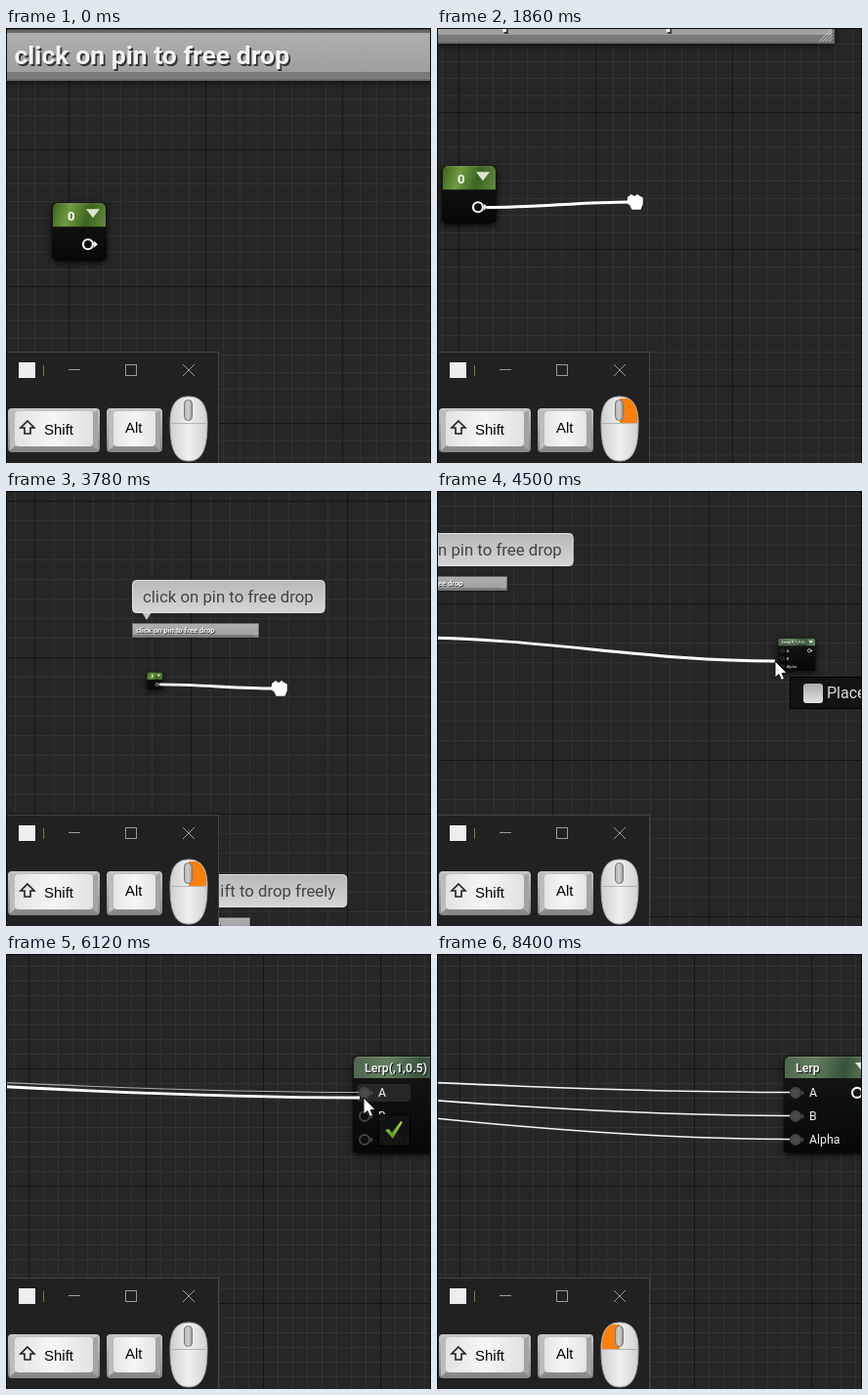
Write an HTML page with a canvas that moves like this. It is 435 px wide and 445 px high and loops after 8460 ms.

```html
<!DOCTYPE html>
<html lang="en">
<head>
<meta charset="utf-8">
<title>Free drop</title>
<style>
html, body { margin: 0; width: 100%; height: 100%; overflow: hidden; background: #262626; }
canvas { display: block; }
</style>
</head>
<body>
<canvas id="stage" width="435" height="445"></canvas>
<script>
const ctx = document.getElementById('stage').getContext('2d');
const W = 435, H = 445, LOOP = 8460, STEP = 60;
const UI = 'Roboto, sans-serif', KEY = '"Liberation Sans", Arial, sans-serif';
const ORANGE = '#ff7f0a';

// Tracks hold [time, x, y]; the camera is zoom plus the screen place of the world origin.
const POINTER = [
  [120, 415, 63], [480, 250, 130], [900, 87, 217], [1260, 87, 217], [1560, 246, 213],
  [1620, 246, 213], [1860, 199, 178], [1980, 235, 193], [3180, 235, 193], [3420, 311, 200],
  [3600, 311, 200], [3780, 276, 202], [4140, 90, 154], [4440, 346, 174], [5400, 346, 174],
  [5760, 366, 147], [6120, 366, 147], [6360, 368, 168], [6660, 368, 168], [6900, 373, 184],
  [7440, 373, 184], [7920, 452, 160]
];
const PAN_A = [[1620, -6, 1.5], [1860, -48, -36.5], [1980, -17, -19]];
const PAN_B = [[3600, 163, 132.5], [3780, 129, 135], [4140, -58, 87]];
const ZOOMS = [
  [2040, .75], [2220, .675], [2640, .5], [2820, .375], [3240, .25],
  [4560, .375], [4800, .5], [5040, .675], [5280, .75]
];
const CLICKS = [1140, 6000, 6540, 7140, 7980, 8400];
const TITLES = ['Lerp(0,1,0.5)', 'Lerp(,1,0.5)', 'Lerp(,,0.5)', 'Lerp'];
const LERP_WIDTHS = [115, 108, 102, 94];
const PINS = ['A', 'B', 'Alpha'];
const within = (t, a, b) => t >= a && t < b;

function track(keys, t) {
  if (t <= keys[0][0]) return keys[0].slice(1);
  for (let i = 1; i < keys.length; i++) {
    const [t0, x0, y0] = keys[i - 1], [t1, x1, y1] = keys[i];
    if (t < t1) {
      const k = (t - t0) / (t1 - t0);
      return [x0 + (x1 - x0) * k, y0 + (y1 - y0) * k];
    }
  }
  return keys[keys.length - 1].slice(1);
}

function camera(t) {
  let z = .875, [x, y] = track(PAN_A, t), panned = false;
  const panB = () => { if (!panned && t >= 3600) { [x, y] = track(PAN_B, t); panned = true; } };
  for (const [time, next] of ZOOMS) {
    if (time > 3600) panB();
    if (t < time) break;
    const [fx, fy] = time < 3600 ? [235, 193] : [346, 174];
    x = fx - (fx - x) * next / z;
    y = fy - (fy - y) * next / z;
    z = next;
  }
  return { z, x, y };
}

function box(x, y, w, h, r, fill, stroke) {
  ctx.beginPath();
  ctx.roundRect(x, y, w, h, r);
  if (fill) { ctx.fillStyle = fill; ctx.fill(); }
  if (stroke) { ctx.strokeStyle = stroke; ctx.lineWidth = 1; ctx.stroke(); }
}

function poly(points, fill, stroke, width = 1) {
  ctx.beginPath();
  points.forEach(([x, y]) => ctx.lineTo(x, y));
  ctx.closePath();
  if (fill) { ctx.fillStyle = fill; ctx.fill(); }
  if (stroke) { ctx.strokeStyle = stroke; ctx.lineWidth = width; ctx.stroke(); }
}

function line(x0, y0, x1, y1, color, width = 1) {
  ctx.beginPath();
  ctx.moveTo(x0, y0);
  ctx.lineTo(x1, y1);
  ctx.strokeStyle = color;
  ctx.lineWidth = width;
  ctx.stroke();
}

function text(str, x, y, font, color) {
  ctx.font = font;
  ctx.fillStyle = color;
  ctx.fillText(str, x, y);
}

function fade(x0, y0, x1, y1, ...colors) {
  const g = ctx.createLinearGradient(x0, y0, x1, y1);
  colors.forEach((c, i) => g.addColorStop(i / (colors.length - 1), c));
  return g;
}

function placed(x, y, scale, draw) {
  ctx.save();
  ctx.translate(x, y);
  ctx.scale(scale, scale);
  draw();
  ctx.restore();
}

function drawGrid(cam, t) {
  ctx.fillStyle = '#262626';
  ctx.fillRect(0, 0, W, H);
  let cell = 20;
  while (cell * cam.z <= 10) cell *= 2;
  const [px, py] = t < 4500 ? [-400, 140] : [65, 112];
  const step = cell * cam.z, gx = cam.x + px * cam.z, gy = cam.y + py * cam.z;
  for (const major of [false, true]) {
    ctx.fillStyle = major ? '#151515' : '#323232';
    const rule = (start, size, put) => {
      for (let i = Math.ceil(-start / step); start + i * step < size; i++)
        if ((i % 8 === 0) === major) put(Math.round(start + i * step));
    };
    rule(gx, W, x => ctx.fillRect(x, 0, 1, H));
    rule(gy, H, y => ctx.fillRect(0, y, W, 1));
  }
}

function drawComment(cam, wx, wy, label) {
  const { z } = cam, x = cam.x + wx * z, y = cam.y + wy * z, w = 520 * z, h = 60 * z;
  ctx.save();
  ctx.shadowColor = 'rgba(0,0,0,.7)';
  ctx.shadowBlur = 8 * z;
  ctx.shadowOffsetY = 2 * z;
  box(x, y, w, h, 1, '#686868');
  ctx.restore();
  ctx.fillStyle = fade(0, y, 0, y + h, '#b0b0b0', '#9c9c9c');
  ctx.fillRect(x + 3 * z, y + 4 * z, w - 6 * z, h - 14 * z);
  ctx.fillStyle = '#7a7a7a';
  ctx.fillRect(x + 3 * z, y + h - 10 * z, w - 6 * z, 8 * z);
  for (let i = 1; i < 5; i++)
    line(x + w - 4 * i * z - 2, y + h - 2, x + w - 2, y + h - 4 * i * z - 2, '#c8c8c8', z);
  const font = `bold ${30.4 * z}px ${UI}`, off = Math.max(.6, 2 * z);
  text(label, x + 16.5 * z + off, y + 40.5 * z + off, font, '#333');
  text(label, x + 16.5 * z, y + 40.5 * z, font, '#f4f4f4');

  if (z > .5) return;
  const bubble = `16.8px ${UI}`;
  ctx.font = bubble;
  const bw = ctx.measureText(label).width + 23, by = y - 44;
  poly([[x + 10, by + 33], [x + 20, by + 33], [x + 15, by + 41]], '#c4c4c4');
  box(x + .5, by + .5, bw - 1, 33, 4, fade(0, by, 0, by + 34, '#b8b8b8', '#d6d6d6'), '#e0e0e0');
  text(label, x + 11, by + 23, bubble, '#444');
}

function nodeBody(w, h, header, fill) {
  ctx.save();
  ctx.shadowColor = 'rgba(0,0,0,.8)';
  ctx.shadowBlur = 7;
  ctx.shadowOffsetY = 2;
  box(0, 0, w, h, 5, fade(0, 0, 0, h, '#151815', '#060706'));
  ctx.restore();
  box(1, 1, w - 2, header, [5, 5, 0, 0], fill);
  ctx.fillStyle = 'rgba(255,255,255,.18)';
  ctx.fillRect(4, 1, w - 8, 1);
  poly([[w - 21, 7], [w - 7, 7], [w - 14, 16]], '#dbe6d2');
}

function outPin(x, y) {
  ctx.beginPath();
  ctx.arc(x, y, 5, 0, 7);
  ctx.strokeStyle = '#f2f2f2';
  ctx.lineWidth = 2.2;
  ctx.stroke();
  poly([[x + 6, y - 3.5], [x + 10, y], [x + 6, y + 3.5]], '#f2f2f2');
}

function drawConstant(cam, hot) {
  placed(cam.x + 60.5 * cam.z, cam.y + 202 * cam.z, cam.z / .875, () => {
    nodeBody(56, 60, 24, fade(0, 0, 56, 18, '#385a1c', '#6f9c40', '#3c6420', '#62883c'));
    if (hot) box(20, 32, 32, 23, 3, fade(20, 0, 52, 0, '#777', '#333'));
    text('0', 16, 19, `bold 13px ${UI}`, '#fff');
    outPin(37, 43);
  });
}

function drawLerp(cam, made, hover) {
  placed(cam.x + 1628 * cam.z, cam.y + 254.5 * cam.z, cam.z / .75, () => {
    const w = LERP_WIDTHS[made];
    nodeBody(w, 100, 22, fade(0, 0, w, 16, '#4c634c', '#62805f', '#36523a', '#6c8868'));
    text(TITLES[made], 13, 18, `bold 12.3px ${UI}`, '#111');
    text(TITLES[made], 12, 17, `bold 12.3px ${UI}`, '#eee');
    PINS.forEach((name, i) => {
      const y = 38 + i * 24;
      if (hover === i) box(4, y - 9, 55, 18, 4, '#262826');
      ctx.beginPath();
      ctx.arc(12, y, 5, 0, 7);
      ctx.fillStyle = i < made ? '#484a48' : '#0c0d0c';
      ctx.fill();
      ctx.strokeStyle = '#424442';
      ctx.lineWidth = 2;
      ctx.stroke();
      poly([[18, y - 3], [21, y], [18, y + 3]], '#424442');
      text(name, 26, y + 4.5, `12.3px ${UI}`, '#eee');
    });
    outPin(w - 19, 38);
  });
}

function drawWire(x0, y0, x1, y1, color, width) {
  const pull = (Math.min(Math.abs(x1 - x0), 1000) + Math.min(Math.abs(y1 - y0), 1000)) / 3;
  ctx.beginPath();
  ctx.moveTo(x0, y0);
  ctx.bezierCurveTo(x0 + pull, y0, x1 - pull, y1, x1, y1);
  ctx.strokeStyle = color;
  ctx.lineWidth = width;
  ctx.stroke();
}

function check(x, y, color) {
  poly([[x - 9, y], [x - 5, y - 1], [x - 2, y + 3], [x + 7, y - 9], [x + 9, y - 8], [x - 1, y + 9]], color);
}

function drawTip(x, y, kind) {
  x = Math.round(x) + 15;
  y = Math.round(y) + 16;
  const w = { place: 167, multi: 190, ok: 33 }[kind];
  if (kind !== 'place') { y += 1; if (kind === 'multi') x -= 1; }
  box(x + .5, y + .5, w - 1, 32, 0, 'rgba(17,17,17,.95)', '#000');
  if (kind === 'ok') return check(x + 16, y + 16, fade(0, y + 6, 0, y + 26, '#a5d84a', '#4c8c1c'));
  if (kind === 'multi') {
    check(x + 22, y + 17, fade(0, y + 6, 0, y + 26, '#ffe92e', '#e8b800'));
    return text('Multi-drop mode', x + 37, y + 21, `16px ${UI}`, '#ddd');
  }
  box(x + 14, y + 7, 20, 20, 3, fade(0, y + 7, 0, y + 27, '#aaa', '#e2e2e2'));
  text('Place a new node.', x + 38, y + 22, `16px ${UI}`, '#ddd');
}

function drawArrow(x, y) {
  const shape = [[0, 0], [0, 17], [4, 13.5], [6.5, 19.5], [9.5, 18], [7, 12.5], [12, 12]];
  poly(shape.map(([a, b]) => [x + a, y + b]), '#fff', '#111');
}

function drawHand(x, y) {
  const fist = [[-3, -5], [0, -7], [3, -5], [6, -7], [9, -5], [11, -4], [11, 2], [9, 7], [1, 7], [-1, 3], [-4, 1]];
  poly(fist.map(([a, b]) => [x + a, y + b]), '#fff', '#fff', 1.5);
}

function drawKey(x, w, label, tx, ty) {
  box(x, 389, w, 45, 4, fade(0, 389, 0, 434, '#c6c6c6', '#858585'));
  poly([[x + 2, 391], [x + 8, 394], [x + 8, 427], [x + 2, 432]], '#bcbcbc');
  poly([[x + w - 2, 391], [x + w - 8, 394], [x + w - 8, 427], [x + w - 2, 432]], '#a4a4a4');
  box(x + 7, 392, w - 14, 36, 4, fade(x, 0, x + w, 0, '#e0e0e0', '#f6f6f6', '#dedede'));
  text(label, tx, ty, `15px ${KEY}`, '#000');
}

function drawMouse(button) {
  const body = new Path2D('M187 377C201 377 206 388 206 404C206 428 202 443 187 443C172 443 168 428 168 404C168 388 173 377 187 377Z');
  ctx.fillStyle = fade(168, 0, 206, 0, '#cfcfcf', '#f0f0f0', '#d2d2d2');
  ctx.fill(body);
  ctx.save();
  ctx.clip(body);
  ctx.fillStyle = ORANGE;
  if (button === 'left') ctx.fillRect(169, 379, 18, 25);
  if (button === 'right') ctx.fillRect(187, 379, 18, 25);
  ctx.restore();
  ctx.strokeStyle = '#aaa';
  ctx.lineWidth = 1;
  ctx.stroke(body);
  line(169, 404.5, 205, 404.5, '#b4b4b4');
  box(182.5, 380.5, 8, 21, 4, fade(182, 0, 191, 0, '#aaa', '#d0d0d0', '#909090'), '#777');
  if (button === 'wheel') box(183, 388, 8, 11, 4, ORANGE);
}

function drawPanel(button) {
  ctx.fillStyle = '#212121';
  ctx.fillRect(0, 331, 218, 114);
  line(0, 331.5, 218, 331.5, '#444');
  line(217.5, 331, 217.5, 445, '#444');
  ctx.fillStyle = '#eee';
  ctx.fillRect(13, 342, 17, 16);
  ctx.fillStyle = '#8a7628';
  ctx.fillRect(38, 345, 1, 11);
  line(64, 349.5, 76, 349.5, '#999');
  ctx.strokeRect(122.5, 344.5, 11, 11);
  line(181, 344, 193, 356, '#999');
  line(193, 344, 181, 356, '#999');
  drawKey(2, 94, 'Shift', 39, 416);
  poly([[22, 402], [29, 409], [25, 409], [25, 415], [19, 415], [19, 409], [15, 409]], null, '#222', 1.6);
  drawKey(103, 57, 'Alt', 122, 414);
  drawMouse(button);
}

function pressed(t) {
  if (CLICKS.some(c => within(t, c, c + 120))) return 'left';
  if (within(t, 1620, 1980) || within(t, 3600, 4140)) return 'right';
  if (ZOOMS.some(([time]) => within(t, time, time + 120))) return 'wheel';
  return '';
}

function render(t) {
  const cam = camera(t), [mx, my] = track(POINTER, t), button = pressed(t);
  const dragging = within(t, 1140, 7980), panning = button === 'right';
  const made = [6000, 6540, 7140].filter(c => t >= c).length;
  const overPins = dragging && t >= 5400 && within(mx, 358, 416);
  const hover = overPins ? Math.max(0, Math.min(2, Math.round((my - 142) / 24))) : -1;

  drawGrid(cam, t);
  drawComment(cam, 0, 0, 'click on pin to free drop');
  drawComment(cam, -36, 1204, 'click and shift to drop freely');
  drawConstant(cam, within(t, 780, 7980) && !panning && cam.z > .3);
  drawLerp(cam, made, hover);

  const sx = cam.x + 113 * cam.z, sy = cam.y + 251.5 * cam.z;
  for (let i = 0; i < made; i++)
    drawWire(sx, sy, 361, 141.5 + i * 24, dragging ? '#a8a8a8' : '#f4f4f4', dragging ? 1.2 : 1.6);
  if (dragging && t >= 1260) drawWire(sx, sy, overPins ? Math.min(mx, 362) : mx, my, '#fff', 2.9);

  if (within(t, 120, 7980)) {
    if (dragging && t > 1260 && !panning)
      drawTip(mx, my, overPins ? 'ok' : t >= 5280 ? 'multi' : 'place');
    if (panning) drawHand(mx, my); else drawArrow(mx, my);
  }

  drawPanel(button);
  ctx.fillStyle = '#0a0a0a';
  ctx.fillRect(0, 0, W, 1);
  ctx.fillRect(0, 0, 1, H);
  ctx.fillRect(W - 1, 0, 1, H);
}

const start = performance.now();
function tick() {
  const t = (performance.now() - start) % LOOP;
  render(Math.floor(t / STEP) * STEP);
  requestAnimationFrame(tick);
}
tick();
</script>
</body>
</html>
```
